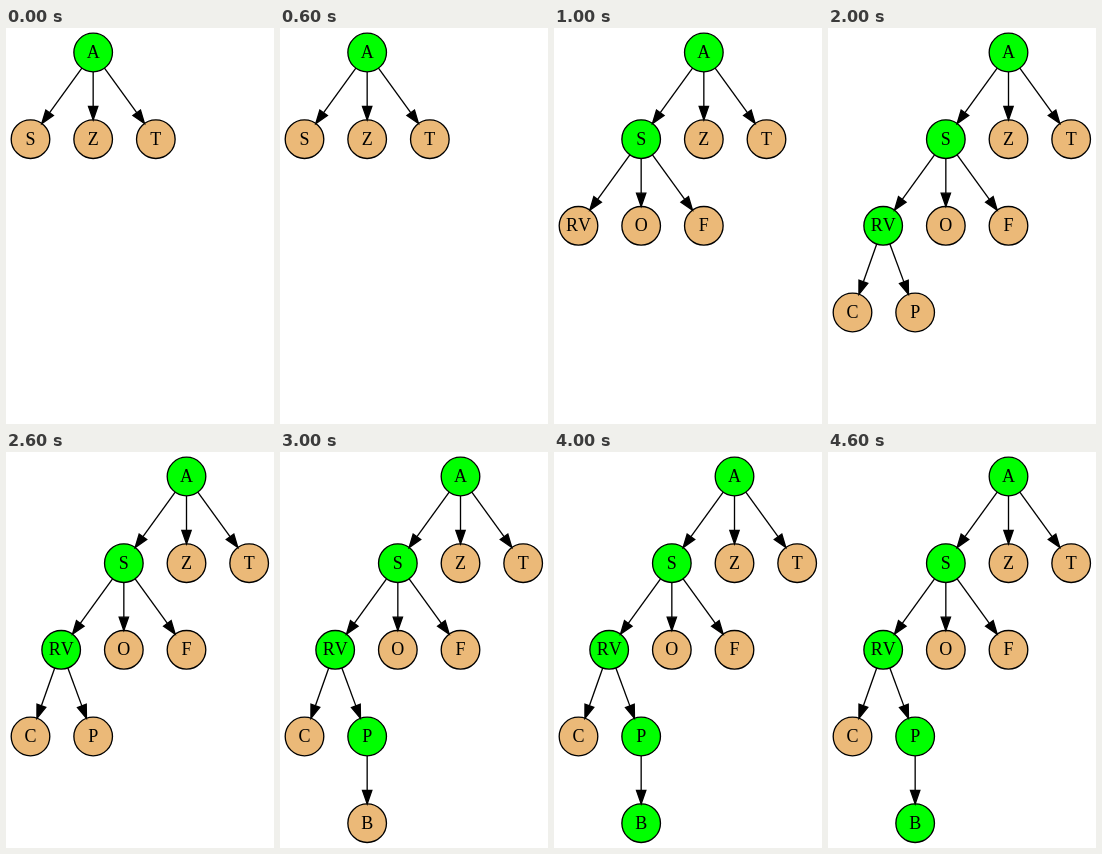
Animation, 268 px wide and 396 px high, one loop 5 s. Source, as an HTML page:

```html
<!DOCTYPE html>
<html lang="en">
<head>
<meta charset="utf-8">
<title>Tree search</title>
<style>
  html, body { margin: 0; width: 100%; height: 100%; overflow: hidden; background: #fff; }
  svg { display: block; width: 268px; height: 396px; }
  g { visibility: hidden; animation: show 5s step-end infinite; }
  circle { fill: #ebb978; }
  circle.visited { fill: #0f0; }
  circle, line, polygon { stroke: #000; stroke-width: 1.33; }
  text { font: 18px "Liberation Serif", "Times New Roman", serif; font-kerning: none; text-anchor: middle; }
  @keyframes show {
    0% { visibility: visible; }
    20%, 100% { visibility: hidden; }
  }
</style>
</head>
<body>
<svg id="stage" viewBox="0 0 268 396"></svg>
<script>
  const POINT = 4 / 3; // pixels per point
  const RADIUS = 19.3, ARROW = 10 * POINT, HALF_WIDTH = 3.5 * POINT;
  const COLUMN = 47, ROW = 65, HALF = 23; // in points

  // name: [parent, x in points, depth, on the search path]
  const tree = {
    A: [null, 2 * COLUMN, 0, true],
    S: ['A', COLUMN, 1, true], Z: ['A', 2 * COLUMN, 1], T: ['A', 3 * COLUMN, 1],
    RV: ['S', 0, 2, true], O: ['S', COLUMN, 2], F: ['S', 2 * COLUMN, 2],
    C: ['RV', -HALF, 3], P: ['RV', COLUMN - HALF, 3, true],
    B: ['P', COLUMN - HALF, 4, true]
  };
  // Horizontal offset of the layout at each step
  const shifts = [-COLUMN, 0, HALF, HALF, HALF];

  function add(parent, tag, attrs, label = '') {
    const el = document.createElementNS('http://www.w3.org/2000/svg', tag);
    for (const key in attrs) el.setAttribute(key, attrs[key]);
    el.textContent = label;
    return parent.appendChild(el);
  }

  function place(name, shift) {
    const [, x, depth] = tree[name];
    return { x: 24.5 + POINT * (x + shift), y: 24.5 + POINT * ROW * depth };
  }

  function drawEdge(group, from, to) {
    const dx = to.x - from.x, dy = to.y - from.y;
    const length = Math.hypot(dx, dy);
    const ux = dx / length, uy = dy / length;
    const along = (d, side = 0) => [from.x + ux * d - uy * side, from.y + uy * d + ux * side];
    const tip = length - RADIUS, base = tip - ARROW;
    const [x1, y1] = along(RADIUS), [x2, y2] = along(base);
    add(group, 'line', { x1, y1, x2, y2 });
    add(group, 'polygon', { points: [along(tip), along(base, HALF_WIDTH), along(base, -HALF_WIDTH)].join(' ') });
  }

  function drawNode(group, name, { x, y }, visited) {
    add(group, 'circle', { cx: x, cy: y, r: RADIUS, class: visited ? 'visited' : '' });
    add(group, 'text', { x, y: Math.round(y + 5.6) }, name);
  }

  shifts.forEach((shift, step) => {
    const group = add(document.getElementById('stage'), 'g', { style: `animation-delay: ${step - 5}s` });
    const shown = Object.keys(tree).filter(name => tree[name][2] <= step + 1);
    for (const name of shown) {
      const [parent, , depth, onPath] = tree[name];
      drawNode(group, name, place(name, shift), onPath && depth <= step);
      if (parent) drawEdge(group, place(parent, shift), place(name, shift));
    }
  });
</script>
</body>
</html>
```
